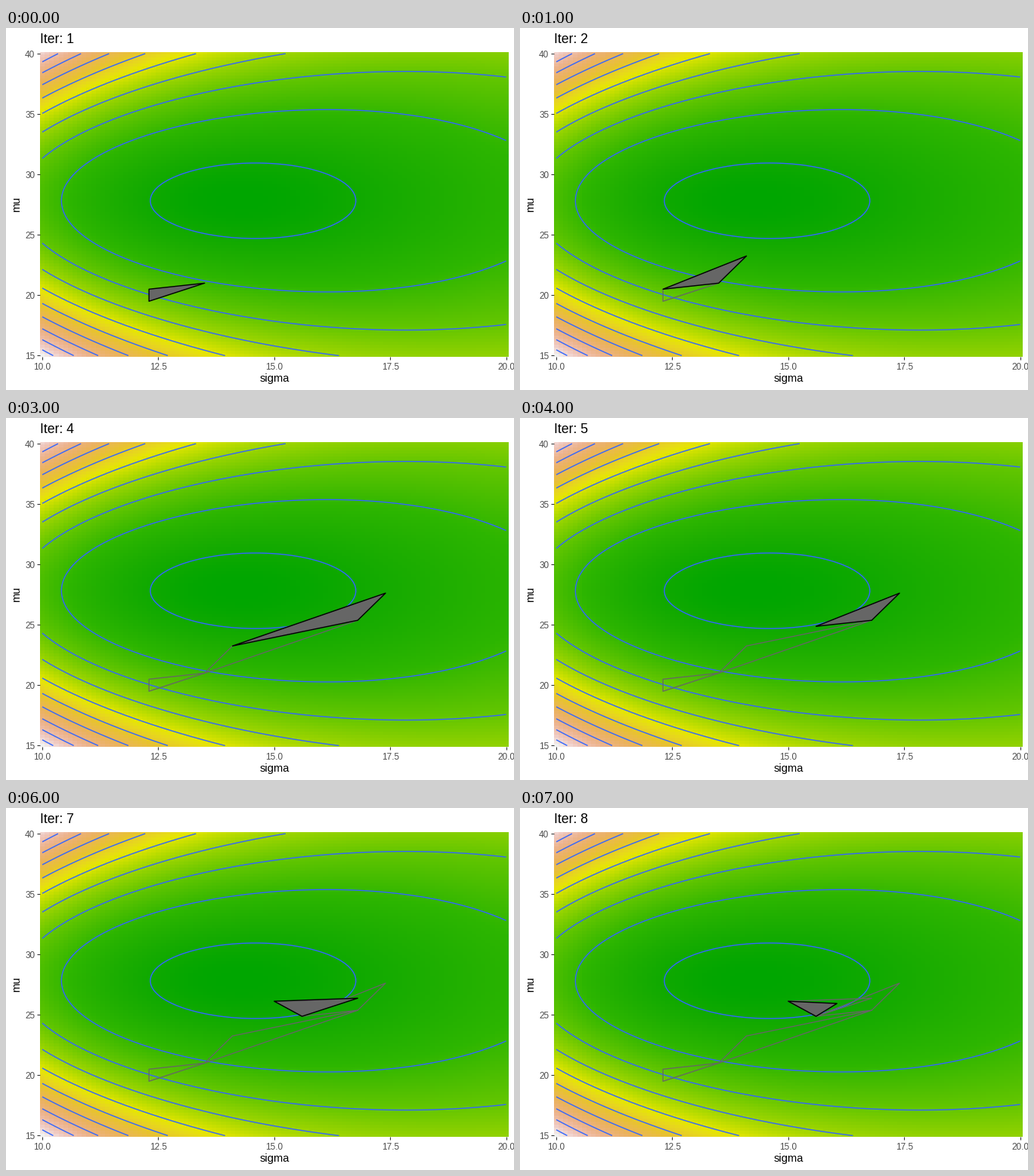
Write a matplotlib script that moves like this. It is 672 px wide and 480 px high and loops after 8000 ms.

```python
import numpy as np
import matplotlib.pyplot as plt
from matplotlib.animation import FuncAnimation
from matplotlib.colors import to_rgb
from matplotlib.patches import Polygon

W, H, DPI = 672, 480, 96
PX = 72 / DPI  # points per pixel
LEFT, RIGHT, TOP, BOTTOM = 44.95, 664.67, 32.0, 436.4
MU_HAT, VAR_HAT = 27.82, 203.4
GREY = "#666666"

plt.rcParams["font.family"] = "Liberation Sans"

TERRAIN = ["#00A600", "#2DB600", "#63C600", "#A0D600", "#E6E600",
           "#E8C32E", "#EBB25E", "#EDB48E", "#F0C9C0", "#F2F2F2"]
RGB_TO_XYZ = np.array([[0.4124, 0.3576, 0.1805],
                       [0.2126, 0.7152, 0.0722],
                       [0.0193, 0.1192, 0.9505]])


def terrain(t):
    """Colours for t in 0..1, blended in Lab space."""
    stops = np.array([to_rgb(c) for c in TERRAIN])
    linear = np.where(stops > 0.04045, ((stops + 0.055) / 1.055) ** 2.4, stops / 12.92)
    roots = np.cbrt(linear @ RGB_TO_XYZ.T)
    pos = np.linspace(0, 1, len(stops))
    mixed = np.stack([np.interp(t, pos, roots[:, k]) for k in range(3)], axis=-1)
    lin = np.clip(mixed ** 3 @ np.linalg.inv(RGB_TO_XYZ).T, 0, 1)
    return np.clip(np.where(lin > 0.0031308, 1.055 * lin ** (1 / 2.4) - 0.055, 12.92 * lin), 0, 1)


def loss(sigma, mu):
    """Mean negative log-likelihood of a normal sample."""
    return (0.5 * np.log(2 * np.pi) + np.log(sigma)
            + (VAR_HAT + (mu - MU_HAT) ** 2) / (2 * sigma ** 2))


def simplex_steps():
    """Nelder-Mead triangles; each move is (replaced vertex, step factor)."""
    expand, reflect, contract = 2, 1, -0.5
    moves = [(0, expand), (0, expand), (0, reflect), (0, contract),
             (1, contract), (0, expand), (1, contract)]
    tri = [np.array(p) for p in [(12.3, 19.5), (12.3, 20.5), (13.5, 21.0)]]
    steps = [np.array(tri)]
    for worst, factor in moves:
        old = tri.pop(worst)
        mid = (tri[0] + tri[1]) / 2
        tri.append(mid + factor * (mid - old))
        steps.append(np.array(tri))
    return steps


fig = plt.figure(figsize=(W / DPI, H / DPI), dpi=DPI, facecolor="white")
ax = fig.add_axes([LEFT / W, 1 - BOTTOM / H, (RIGHT - LEFT) / W, (BOTTOM - TOP) / H])
extent = (9.95, 20.05, 14.875, 40.125)

sigma, mu = np.linspace(10, 20, 101), np.linspace(15, 40, 101)
z = loss(*np.meshgrid(sigma, mu))
ax.imshow(terrain((z - z.min()) / (z.max() - z.min())), extent=extent,
          origin="lower", aspect="auto", interpolation="nearest")
ax.contour(sigma, mu, z, levels=np.arange(4.1, 5.05, 0.1),
           colors="#3366FF", linewidths=1.42 * PX)
ax.set(xlim=extent[:2], ylim=extent[2:])

for spine in ax.spines.values():
    spine.set_visible(False)
ax.set_xticks(np.arange(10, 20.1, 2.5))
ax.set_yticks(range(15, 41, 5))
ax.xaxis.set_major_formatter("{x:.1f}")
ax.tick_params(length=2.75, width=1.07 * PX, color="#333333",
               labelsize=8.8, labelcolor="#4D4D4D", pad=2.2)
ax.tick_params(axis="x", pad=2.9)


def label(x, y, text, size, **kw):
    return fig.text(x / W, 1 - y / H, text, fontsize=size, color="black",
                    va="baseline", **kw)


title = label(45, 20, "Iter: 1", 13.2)
label((LEFT + RIGHT) / 2, 469, "sigma", 11, ha="center")
label(18, (TOP + BOTTOM) / 2, "mu", 11, ha="center", rotation=90, rotation_mode="anchor")

steps = simplex_steps()


def triangle(points, **kw):
    return ax.add_patch(Polygon(points, closed=True, joinstyle="round", **kw))


# Every second triangle leaves an outline behind.
trails = {i: triangle(steps[i], fill=False, edgecolor=GREY, lw=1.3 * PX, zorder=4)
          for i in range(0, len(steps), 2)}
current = triangle(steps[0], facecolor=GREY, edgecolor="black", lw=1.42 * PX, zorder=5)


def update(i):
    title.set_text(f"Iter: {i + 1}")
    current.set_xy(steps[i])
    for k, trail in trails.items():
        trail.set_visible(k < i)
    return [title, current, *trails.values()]


anim = FuncAnimation(fig, update, frames=len(steps), interval=1000,
                     repeat=True, repeat_delay=0, blit=False)
plt.show()
```
